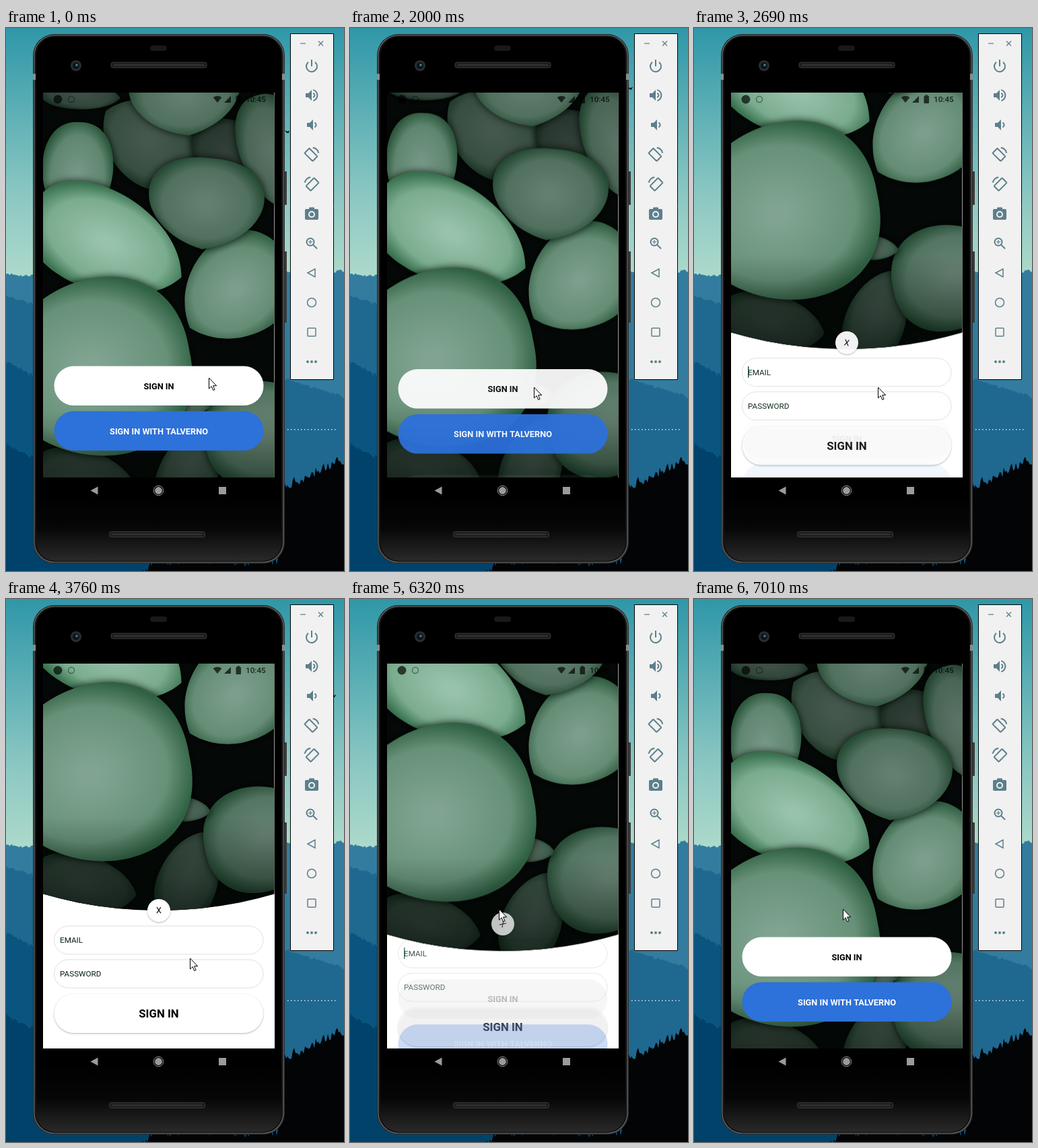
An HTML page with a canvas for the animation above (7560 ms loop, 502x807 px).

```html
<!DOCTYPE html>
<html lang="en">
<head>
<meta charset="utf-8">
<title>Sign-in screen</title>
<style>
html, body { margin: 0; width: 100%; height: 100%; overflow: hidden; background: #000; }
canvas { display: block; width: 502px; height: 807px; }
</style>
</head>
<body>
<canvas id="stage"></canvas>
<script>
const W = 502, H = 807, LOOP = 7560;
const SCREEN = { x: 55, y: 96, w: 344, h: 572 };
const FONT = 'Roboto, Arial, sans-serif';
const dpr = window.devicePixelRatio || 1;

function layer(canvas) {
  canvas.width = W * dpr;
  canvas.height = H * dpr;
  const g = canvas.getContext('2d');
  g.scale(dpr, dpr);
  return g;
}

const ctx = layer(document.getElementById('stage'));

function random(seed) {
  return () => (seed = (seed * 16807) % 2147483647) / 2147483647;
}

// ---- drawing helpers ----
function paint(g, fill, stroke) {
  if (fill) { g.fillStyle = fill; g.fill(); }
  if (stroke) { g.strokeStyle = stroke; g.stroke(); }
}

function rbox(g, x, y, w, h, r, fill, stroke) {
  g.beginPath();
  g.roundRect(x, y, w, h, r);
  paint(g, fill, stroke);
}

function disc(g, x, y, r, fill, stroke) {
  g.beginPath();
  g.arc(x, y, r, 0, 7);
  paint(g, fill, stroke);
}

function poly(g, pts, fill, stroke) {
  g.beginPath();
  for (const [x, y] of pts) g.lineTo(x, y);
  g.closePath();
  paint(g, fill, stroke);
}

function line(g, x0, y0, x1, y1) {
  g.beginPath();
  g.moveTo(x0, y0);
  g.lineTo(x1, y1);
  g.stroke();
}

function arc(g, x, y, r, from, to) {
  g.beginPath();
  g.arc(x, y, r, from, to);
  g.stroke();
}

function label(g, str, x, y, font, color, align = 'center') {
  g.font = font + ' ' + FONT;
  g.textAlign = align;
  g.fillStyle = color;
  g.fillText(str, x, y);
}

function ramp(g, y0, y1, ...colors) {
  const grad = g.createLinearGradient(0, y0, 0, y1);
  colors.forEach((c, i) => grad.addColorStop(i / (colors.length - 1), c));
  return grad;
}

// ---- wallpaper ----
function ridge(g, color, jag, height) {
  const rnd = random(7 + jag);
  g.beginPath();
  g.moveTo(0, H);
  for (let x = 0; x <= W; x += 2) g.lineTo(x, height(x) - rnd() * jag);
  g.lineTo(W, H);
  paint(g, color);
}

function wallpaper(g) {
  g.fillStyle = ramp(g, 0, 370, '#2f97a8', '#5cafb5', '#8bc7c2', '#addacb');
  g.fillRect(0, 0, W, H);
  ridge(g, '#337c9f', 4, x => 366 + 4 * Math.sin(x / 17));
  ridge(g, '#1f6890', 5, x => 400 + x * .3);
  ridge(g, '#0a5480', 6, x => 500 + x * .5);
  ridge(g, '#00426a', 7, x => 622 + x * .5);
  ridge(g, '#020406', 16, x => x < 405 ? Math.max(800, 1020 - x) : 694 - (x - 405) * .47);
}

// ---- emulator toolbar ----
function toolbar(g) {
  const ink = '#5d7f8b', paper = '#f1f1f1';
  const speaker = x => poly(g, [[x, -3], [x + 4, -3], [x + 9, -8], [x + 9, 8], [x + 4, 3], [x, 3]], ink);
  const rotate = side => {
    g.scale(side, 1);
    arc(g, 0, 0, 10.5, -1.4, -.2);
    g.rotate(Math.PI / 4);
    rbox(g, -9, -4, 17, 10, 1, null, ink);
  };
  const icons = [
    () => { arc(g, 0, 1, 8, -.9, Math.PI + .9); line(g, 0, -9, 0, 1); },
    () => { speaker(-9); arc(g, 0, 0, 8.4, -1.3, 1.3); arc(g, 1, 0, 3.4, -1.2, 1.2); },
    () => { speaker(-7); arc(g, 3, 0, 3.6, -1.2, 1.2); },
    () => rotate(1),
    () => rotate(-1),
    () => {
      rbox(g, -10, -7, 20, 16, 2, ink);
      rbox(g, -4, -9.5, 8, 5, 1, ink);
      disc(g, 0, 1, 5, paper);
      disc(g, 0, 1, 3, ink);
    },
    () => {
      disc(g, -2, -2, 5.5, null, ink);
      line(g, 2, 2, 8, 8);
      g.lineWidth = 1.2;
      line(g, -5, -2, 1, -2);
      line(g, -2, -5, -2, 1);
    },
    () => { g.lineWidth = 1.5; poly(g, [[-6, 0], [5, -6], [5, 6]], null, ink); },
    () => { g.lineWidth = 1.5; disc(g, 0, 0, 6.5, null, ink); },
    () => { g.lineWidth = 1.5; rbox(g, -6, -6, 12, 12, 1, null, ink); },
    () => { for (const x of [-6, 0, 6]) disc(g, x, 0, 2, ink); }
  ];
  g.lineWidth = 1;
  rbox(g, 422.5, 8.5, 64, 514, 0, paper, '#000');
  g.strokeStyle = ink;
  g.lineWidth = 1.2;
  line(g, 437, 23, 445, 23);
  line(g, 464, 19.5, 471, 26.5);
  line(g, 471, 19.5, 464, 26.5);
  icons.forEach((icon, i) => {
    g.save();
    g.translate(454, 56 + 44 * i);
    g.lineWidth = 2;
    icon();
    g.restore();
  });
}

// ---- phone body ----
function phone(g) {
  for (const [y, h] of [[213, 50], [332, 106]]) rbox(g, 412, y, 5, h, 1, '#3a3a3a');
  rbox(g, 40, 9, 374, 787, 32, '#2b2b2b');
  g.lineWidth = 1.2;
  rbox(g, 42, 11, 370, 783, 30, '#141414', '#666');
  rbox(g, 45, 13, 364, 779, 28, ramp(g, 690, 794, '#000', '#060606', '#2b2b2b'));
  g.fillStyle = '#8a8a8a';
  for (const x of [40, 410]) g.fillRect(x, 68, 4, 9);
  rbox(g, 214, 26, 25, 8, 4, '#191919');
  g.lineWidth = 1;
  for (const [x, y] of [[156, 51], [153.5, 748.5]]) {
    rbox(g, x, y, 142, 8, 3, '#1d1d1d', '#3b3b3b');
    rbox(g, x + 4, y + 3, 134, 2, 0, '#343434');
  }
  disc(g, 104, 56, 8, '#2b2d2f');
  disc(g, 104, 56, 5, '#0a1418');
  disc(g, 105, 55, 2, '#2f7486');
  const nav = '#9b9b9b';
  poly(g, [[125.5, 687.5], [136.5, 681.5], [136.5, 693.5]], nav);
  disc(g, 226.5, 687.5, 7.2, null, nav);
  disc(g, 226.5, 687.5, 5.4, nav);
  rbox(g, 316, 682, 11, 11, 0, nav);
}

// ---- backdrop: a few soft leaves, tip along the given angle ----
function leaf(g, x, y, length, width, degrees, tone) {
  const shade = (r, gr, b) => `rgb(${[r, gr, b].map(c => c * tone).join()})`;
  g.save();
  g.translate(x, y);
  g.rotate(degrees * Math.PI / 180);
  g.scale(length, width);
  g.beginPath();
  g.moveTo(-1, 0);
  g.bezierCurveTo(-1.05, -1.4, .65, -1.3, 1, 0);
  g.bezierCurveTo(.65, 1.3, -1.05, 1.4, -1, 0);
  const grad = g.createRadialGradient(0, 0, .1, 0, 0, 1.05);
  grad.addColorStop(0, shade(138, 176, 156));
  grad.addColorStop(.7, shade(112, 156, 130));
  grad.addColorStop(1, shade(52, 104, 72));
  g.shadowColor = 'rgba(0,0,0,.8)';
  g.shadowBlur = 12 * dpr;
  paint(g, grad);
  g.restore();
}

function backdrop(g) {
  g.beginPath();
  g.rect(SCREEN.x, SCREEN.y, 343.4, 640);
  g.clip();
  g.beginPath();
  g.arc(227, SCREEN.y, 613, 0, 7);
  g.clip();
  g.fillStyle = '#040806';
  g.fillRect(0, 0, W, H);
  leaf(g, 110, 99, 60, 22, 5, .45);
  leaf(g, 212, 168, 78, 62, 215, .5);
  leaf(g, 325, 180, 45, 50, 100, .35);
  leaf(g, 266, 98, 62, 82, 85, .72);
  leaf(g, 396, 185, 88, 48, 75, .65);
  leaf(g, 106, 220, 80, 52, 93, .85);
  leaf(g, 342, 388, 90, 74, 140, .9);
  leaf(g, 297, 261, 68, 85, 95, .72);
  leaf(g, 150, 319, 122, 74, 25, 1.1);
  leaf(g, 115, 672, 80, 45, 10, .4);
  leaf(g, 272, 660, 72, 44, 290, .5);
  leaf(g, 386, 601, 92, 78, -10, .75);
  leaf(g, 262, 558, 42, 19, 5, .6);
  leaf(g, 125, 507, 150, 131, 170, .93);
  g.fillStyle = ramp(g, 570, 709, 'rgba(0,8,4,0)', 'rgba(0,8,4,.5)');
  g.fillRect(0, 570, W, 200);
}

function cached(...parts) {
  const canvas = document.createElement('canvas');
  const g = layer(canvas);
  for (const part of parts) part(g);
  return canvas;
}

function dots(g) {
  for (let x = 418; x <= 490; x += 5) rbox(g, x, 596, 1.5, 1.5, 0, '#dce9ee');
}

const back = cached(wallpaper);
const front = cached(phone, toolbar, dots);
const photo = cached(backdrop);

// ---- motion ----
const clamp = k => Math.min(1, Math.max(0, k));
const smooth = (t, from, to) => {
  const k = clamp((t - from) / (to - from));
  return k * k * (3 - 2 * k);
};

// cubic-bezier(.42, 0, 1, 1) solved by bisection
function easeIn(x) {
  let lo = 0, hi = 1;
  for (let i = 0; i < 24; i++) {
    const s = (lo + hi) / 2, r = 1 - s;
    if (1.26 * r * r * s + 3 * r * s * s + s * s * s < x) lo = s; else hi = s;
  }
  return lo * lo * (3 - 2 * lo);
}

function easeInOut(x) {
  const k = clamp(x);
  return k < .5 ? easeIn(2 * k) / 2 : 1 - easeIn(2 - 2 * k) / 2;
}

const openness = t => easeInOut((t - 1870) / 955) - easeInOut((t - 6011) / 955);

// climbs beside the phone, then glides off to the right
function bird(t, start, climb, x0, drift) {
  const age = t - start, k = clamp(age / climb);
  if (age < 0 || age > climb + 1000) return;
  const x = x0 + drift * k - 14 * Math.sin(Math.PI * k) ** 2 + Math.max(0, age - climb) * .115;
  const y = 154 - 72 * k, flap = Math.sin(t / 70);
  poly(ctx, [[x - 3.5, y - 2 - flap], [x, y], [x + 3.5, y - 1.5 + flap], [x + 1, y + 2.5], [x - 2, y + 1]], '#000');
}

function pointer(t) {
  const a = smooth(t, 0, 1200), b = smooth(t, 4390, 5090);
  ctx.save();
  ctx.translate(301.5 - 28 * a - 52 * b, 520 + 14 * a - 73 * b);
  ctx.lineWidth = 1;
  poly(ctx, [[0, 0], [0, 16], [3.7, 12.6], [6.2, 18.5], [8.6, 17.5], [6.1, 11.7], [11.2, 11.7]], '#fff', '#000');
  ctx.restore();
}

// ---- app ----
function raise(on) {
  ctx.shadowColor = on ? 'rgba(0,0,0,.3)' : 'transparent';
  ctx.shadowBlur = on ? 2.5 * dpr : 0;
  ctx.shadowOffsetY = on ? dpr : 0;
}

function field(y, name) {
  ctx.lineWidth = 1;
  rbox(ctx, 71.5, y, 310.5, 42, 21, null, 'rgba(0,0,0,.13)');
  label(ctx, name, 80, y + 25.3, '11.7px', '#04200f', 'left');
}

function form(p, t) {
  ctx.save();
  ctx.globalAlpha = p;
  ctx.translate(0, 82 * (1 - p));
  field(486, 'EMAIL');
  field(536, 'PASSWORD');
  if (Math.floor((t - 2220) / 500) % 2 === 0) rbox(ctx, 80, 498, 1.5, 17, 0, '#14503a');
  raise(true);
  rbox(ctx, 71.5, 587, 310.5, 58, 29, '#fff');
  disc(ctx, 227, 463, 17, '#fff');
  raise(false);
  label(ctx, 'SIGN IN', 227, 622, 'bold 16.8px', '#000');
  ctx.translate(227, 463);
  ctx.rotate(Math.PI * (1 - p));
  label(ctx, 'X', 0, 4.4, '12.5px', '#000');
  ctx.restore();
}

function button(y, text, fill, color) {
  rbox(ctx, 71.5, y, 311, 58.5, 29, fill);
  label(ctx, text, 227, y + 34.1, 'bold 12.75px', color);
}

function buttons(p) {
  const tint = 255 - 50 * p;
  ctx.save();
  ctx.globalAlpha = 1 - p;
  ctx.translate(0, 83 * p);
  button(502.5, 'SIGN IN', `rgb(${tint},${tint},${tint})`, '#000');
  button(569.5, 'SIGN IN WITH TALVERNO', '#2d71da', '#fff');
  ctx.restore();
}

function statusBar() {
  const ink = 'rgba(0,0,0,.68)';
  disc(ctx, 77, 106, 6.5, ink);
  ctx.lineWidth = 1.5;
  disc(ctx, 97, 106, 4.5, null, 'rgba(0,0,0,.4)');
  ctx.beginPath();
  ctx.moveTo(314, 111);
  ctx.arc(314, 111, 10, -2.25, -.89);
  paint(ctx, ink);
  poly(ctx, [[324, 111], [334, 101], [334, 111]], ink);
  rbox(ctx, 341.5, 101, 7.5, 11, 1, ink);
  rbox(ctx, 343.5, 99.5, 3.5, 1.5, 0, ink);
  label(ctx, '10:45', 356, 110.3, '500 11.7px', 'rgba(0,0,0,.75)', 'left');
}

function draw(t) {
  const p = openness(t);
  ctx.drawImage(back, 0, 0, W, H);
  bird(t, 0, 2230, 418, 0);
  bird(t, 3530, 1640, 488, 9);
  ctx.drawImage(front, 0, 0, W, H);
  ctx.save();
  ctx.beginPath();
  ctx.rect(SCREEN.x, SCREEN.y, SCREEN.w, SCREEN.h);
  ctx.clip();
  ctx.fillStyle = '#fff';
  ctx.fillRect(SCREEN.x, SCREEN.y, SCREEN.w, SCREEN.h);
  ctx.drawImage(photo, 0, -246 * p, W, H);
  form(p, t);
  buttons(p);
  statusBar();
  ctx.restore();
  pointer(t);
}

const start = performance.now();
function tick(now) {
  draw(Math.max(0, now - start) % LOOP);
  requestAnimationFrame(tick);
}
draw(0);
requestAnimationFrame(tick);
</script>
</body>
</html>
```
